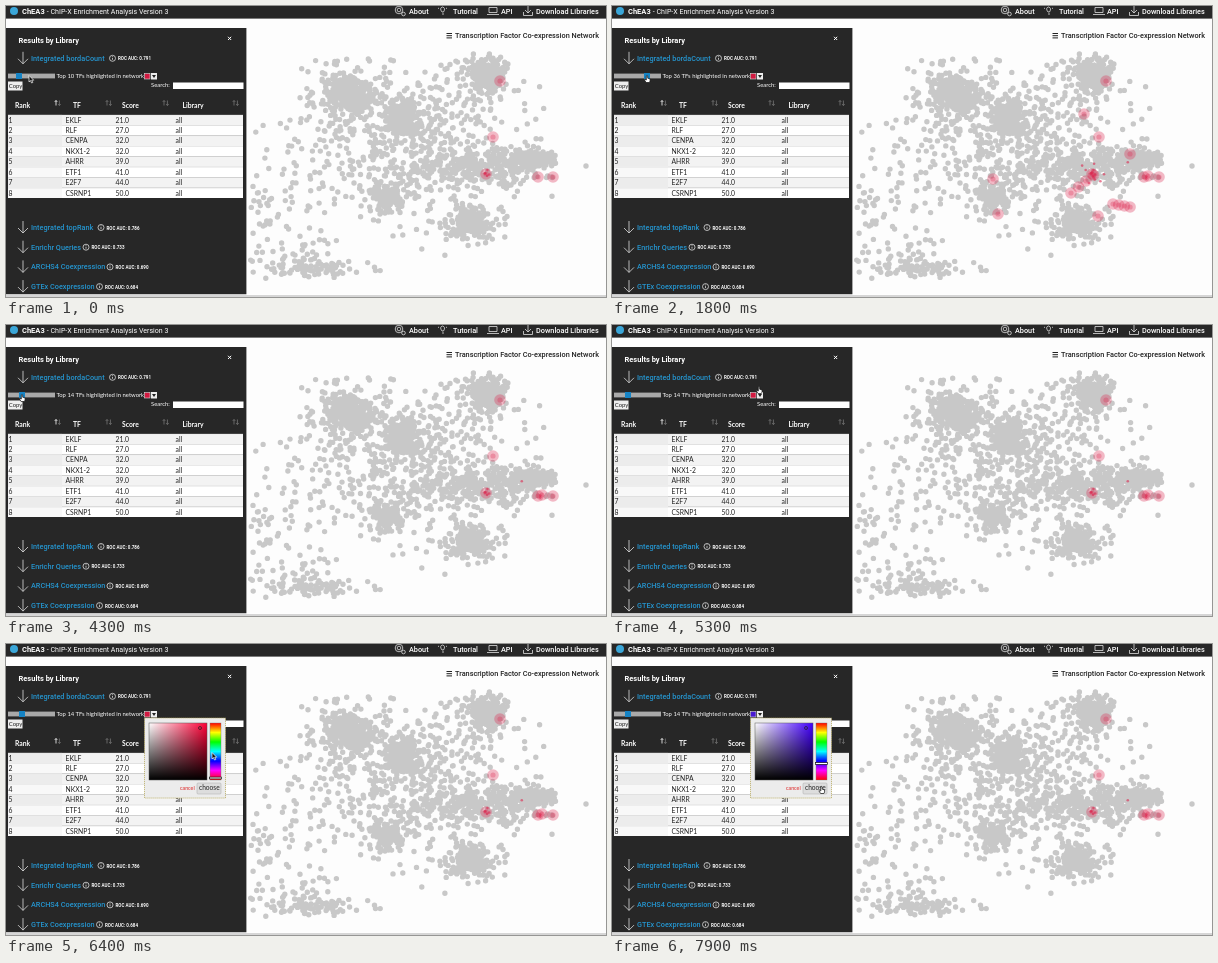
Animation of 600x291 px, one loop 8000 ms. Source, as an HTML page:

```html
<!DOCTYPE html>
<html lang="en">
<head>
<meta charset="utf-8">
<title>Transcription factor network</title>
<style>
html, body { margin: 0; width: 100%; height: 100%; overflow: hidden; background: #fdfdfd; }
svg { display: block; width: 100vw; height: 100vh; }
text { font: 500 7.3px Roboto, sans-serif; fill: #fff; white-space: pre; }
.title { font-weight: 700; font-size: 7.5px; }
.light { font-weight: 400; font-size: 7.05px; }
.dark { fill: #222; }
.link { fill: #2595cf; }
.roc { font-weight: 700; font-size: 4.5px; }
.label { font: 400 5.9px Lato, sans-serif; }
.cell { font: 400 6.8px Lato, sans-serif; fill: #222; }
.head { font: 700 6.8px Lato, sans-serif; }
.line { fill: none; stroke: #ddd; stroke-width: .8; }
.bold { stroke: #fff; stroke-width: 1; }
.ink { stroke: #222; stroke-width: 1; }
</style>
</head>
<body>
<svg id="stage" viewBox="0 0 600 291" xmlns="http://www.w3.org/2000/svg">
  <defs>
    <linearGradient id="toWhite"><stop stop-color="#fff"/><stop offset="1" stop-color="#fff" stop-opacity="0"/></linearGradient>
    <linearGradient id="toBlack" x2="0" y2="1"><stop stop-opacity="0"/><stop offset="1"/></linearGradient>
    <linearGradient id="spectrum" x2="0" y2="1"></linearGradient>
    <clipPath id="tableClip"><rect x="2" y="108.7" width="235" height="83.3"/></clipPath>
  </defs>
  <rect width="600" height="291" fill="#fdfdfd"/>
  <path id="dots" fill="none" stroke="#c8c8c8" stroke-width="5.4" stroke-linecap="round"/>
  <g id="hits"></g>
  <g id="page"></g>
  <rect id="thumb" y="67" width="6" height="6" fill="#1683c4"/>
  <text id="count" class="label" x="50.5" y="72.4"></text>
  <rect id="swatch" x="138.5" y="67.5" width="5.5" height="5.5" stroke="#ddd" stroke-width=".6"/>
  <rect x="145" y="67" width="6" height="6.5" fill="#eee"/><path d="M146 69h4l-2 3z" fill="#222"/>
  <g id="picker">
    <rect x="138.5" y="74" width="81" height="80" fill="#ececec" stroke="#b9ac62" stroke-width=".8" stroke-dasharray="1.2 .8"/>
    <rect id="shade" x="143" y="79" width="58" height="57"/>
    <rect x="143" y="79" width="58" height="57" fill="url(#toWhite)"/>
    <rect x="143" y="79" width="58" height="57" fill="url(#toBlack)" stroke="#555" stroke-width=".5"/>
    <circle cx="194" cy="84" r="1.5" fill="none" stroke="#222" stroke-width=".7"/>
    <rect x="204" y="79" width="11" height="57" fill="url(#spectrum)" stroke="#777" stroke-width=".4"/>
    <rect id="hueMark" x="203.5" width="12" height="1.8" fill="#fff" stroke="#111" stroke-width=".7"/>
    <text class="label" x="174" y="146" style="fill:#d22;font-size:5.3px">cancel</text>
    <rect x="191" y="139" width="24" height="11" rx="1" fill="#ddd" stroke="#aaa" stroke-width=".5"/>
    <text class="label dark" x="193" y="146.3" style="font-size:6.6px">choose</text>
  </g>
  <g id="cursor" stroke-linejoin="round" stroke-width=".7">
    <path id="arrow" d="M0 0v6.4l1.5-1.3 1.1 2.4 1.2-.5-1.1-2.3h2z" fill="#111" stroke="#fff"/>
    <path id="hand" d="M-.7 .4Q0-.6.7.4V2.7l2.4.7V5.5L2.4 7H-.9L-2.6 4.3l.7-.6 1.2.8z" fill="#fff" stroke="#111"/>
  </g>
</svg>
<script>
const $ = id => document.getElementById(id);
const LOOP = 8000;
const PANEL = '#272727';

const rect = (x, y, w, h, fill) => `<rect x="${x}" y="${y}" width="${w}" height="${h}" fill="${fill}"/>`;
const text = (x, y, s, cls = '') => `<text x="${x}" y="${y}" class="${cls}">${s}</text>`;
const line = (d, cls = '') => `<path class="line ${cls}" d="${d}"/>`;
const ring = (x, y, r) => `<circle class="line" cx="${x}" cy="${y}" r="${r}"/>`;

function header() {
  return rect(0, 0, 600, 12.6, PANEL) + '<circle cx="8" cy="5" r="4" fill="#3aa6d8"/>' +
    text(16, 8, 'ChEA3', 'title') + text(40.8, 8, '- ChIP-X Enrichment Analysis Version 3', 'light') +
    text(403, 7.7, 'About') + text(447, 7.7, 'Tutorial') + text(495, 7.7, 'API') + text(530, 7.7, 'Download Libraries') +
    ring(393, 4, 3.8) + ring(393, 4, 1.8) + ring(397.5, 8, 1.8) +
    line('M436 6Q433 2 436.5 1Q440 2 437.5 6zM436 8h2M432 2l1 .6M441 2l-1 .6') +
    line('M483 1.5h8v5h-8zM481 8.5h12') +
    line('M522 0v7m-3-3 3 3 3-3M517.5 6v3.5h9V6') +
    line('M440.5 27.5h5.5m-5.5 2.2h5.5m-5.5 2.2h5.5', 'ink') +
    text(449, 32, 'Transcription Factor Co-expression Network', 'dark');
}

function library(y, name, score, infoX) {
  return line(`M17 ${y - 9}v12m-5-5 5 5 5-5`) + text(25, y, name, 'link') +
    ring(infoX, y - 2.5, 3) + line(`M${infoX} ${y - 3}v2m0-3.5v.7`) +
    text(infoX + 5.5, y - .4, `ROC AUC: ${score}`, 'roc');
}

function column(x, name, sortX, active) {
  return text(x, 101.6, name, 'head') +
    `<g fill="none" stroke="#777" stroke-width=".8"><path d="M${sortX} 99.5v-5m-1.3 1.4 1.3-1.4 1.3 1.4"${active ? ' stroke="#fff"' : ''}/>` +
    `<path d="M${sortX + 3.4} 94.5v5m-1.3-1.4 1.3 1.4 1.3-1.4"/></g>`;
}

function table() {
  const scores = { EKLF: 21, RLF: 27, CENPA: 32, 'NKX1-2': 32, AHRR: 39, ETF1: 41, E2F7: 44, CSRNP1: 50 };
  const rows = Object.entries(scores).map(([name, score], i) => {
    const y = 108.7 + i * 10.45, base = y + 7.8;
    return rect(2, y, 235, 10.45, i % 2 ? '#fff' : '#f3f3f3') + rect(2, y, 54, 10.45, i % 2 ? '#f8f8f8' : '#ececec') +
      rect(2, y, 235, .5, '#ddd') + text(2.5, base, i + 1, 'cell') + text(59.5, base, name, 'cell') +
      text(109.5, base, score.toFixed(1), 'cell') + text(169.5, base, 'all', 'cell');
  });
  return column(9, 'Rank', 50, true) + column(67, 'TF', 101) + column(116, 'Score', 158) + column(176.5, 'Library', 228) +
    `<g clip-path="url(#tableClip)">${rows.join('')}</g>`;
}

function sidebar() {
  return rect(0, 22, 240.4, 266.5, PANEL) + text(12.5, 37, 'Results by Library', 'title') +
    line('M222 30.8l3.2 3.2m0-3.2-3.2 3.2', 'bold') +
    library(54.8, 'Integrated bordaCount', '0.791', 106.5) +
    rect(2, 67.6, 47, 4.8, '#a9a9a9') +
    rect(2, 75.5, 14.5, 9, '#eee') + text(2.8, 82.3, 'Copy', 'label dark') +
    text(145, 81.2, 'Search:', 'label') + rect(167, 76.5, 70.5, 6.5, '#fff') + table() +
    library(224, 'Integrated topRank', '0.786', 95) + library(243.7, 'Enrichr Queries', '0.733', 80) +
    library(263.4, 'ARCHS4 Coexpression', '0.690', 104) + library(283.1, 'GTEx Coexpression', '0.684', 93.5) +
    rect(0, 288.5, 600, 2.5, '#fff') + rect(0, 289.6, 600, .8, '#999');
}

let seed = 20;
const random = () => (seed = (seed * 16807) % 2147483647) / 2147483647;
const gauss = () => Math.sqrt(-2 * Math.log(random())) * Math.cos(2 * Math.PI * random());

function dots() {
  let d = 'M580 160h0';
  const dot = (x, y) => {
    if (x > 243 && x < 552 && y > 47 && y < 273) d += `M${x.toFixed(1)} ${y.toFixed(1)}h0`;
  };
  const cloud = (cx, cy, sx, sy, n) => {
    while (n--) dot(cx + gauss() * sx, cy + gauss() * sy);
  };
  // a dense core inside a looser fringe
  const cluster = (x, y, size, n) => {
    cloud(x, y, size, size * .9, n);
    cloud(x, y, size * 2.2, size * 1.8, n * .4 | 0);
  };
  cluster(344, 89, 10, 260);
  cluster(396, 111, 8, 170);
  cluster(481, 68, 8, 220);
  cluster(462, 216, 8, 160);
  cluster(383, 193, 8, 90);
  cloud(528, 154, 11, 5, 150);
  cloud(470, 160, 36, 10, 280);
  cloud(400, 135, 56, 40, 480);
  cloud(280, 215, 25, 28, 85);
  cloud(305, 262, 25, 6, 100);
  return d;
}

// highlighted factors in rank order; a speck has no halo
function rankedFactors() {
  const halo = (x, y) => ({ x, y, halo: true });
  const specks = (x, y, spread, n) => Array.from({ length: n }, () => ({ x: x + gauss() * spread, y: y + gauss() * spread }));
  const streak = (x, y, dx, dy) => Array.from({ length: 4 }, (_, i) => halo(x + dx * i, y + dy * i));
  return [
    halo(494, 75), halo(487, 131), halo(480, 168), halo(532, 171), halo(547, 171), ...specks(480, 168, 2.5, 5),
    halo(536, 170), ...specks(516, 156, .5, 1), ...specks(534, 171, 1, 2),
    halo(472, 108), halo(381, 173), halo(386, 208), halo(486, 210), halo(518, 148),
    ...streak(501, 198, 5.7, 1), ...streak(459, 187, 7.5, -6), ...specks(482, 172, 7, 9)
  ];
}

$('page').innerHTML = header() + sidebar();
$('dots').setAttribute('d', dots());
$('hits').innerHTML = rankedFactors().map(({ x, y, halo }) => '<g fill="#dc2850">' +
  (halo ? `<circle cx="${x}" cy="${y}" r="5.8" fill-opacity=".32"/>` : '') +
  `<circle cx="${x}" cy="${y}" r="${halo ? 2.6 : 1.3}" fill-opacity="${halo ? .3 : .6}"/></g>`).join('');
$('spectrum').innerHTML = Array.from({ length: 7 }, (_, i) => `<stop offset="${i / 6}" stop-color="hsl(${i * 60},100%,50%)"/>`).join('');

function ramp(t, from, to) {
  const p = Math.min(1, Math.max(0, (t - from) / (to - from)));
  return p * p * (3 - 2 * p);
}

function draw(time) {
  const t = Math.floor((time % LOOP) / 100) * 100;
  const toMenu = ramp(t, 4600, 5300), toHue = ramp(t, 5800, 6350), alongHue = ramp(t, 6500, 7200), toChoose = ramp(t, 7400, 7850);
  const thumb = 13 + 22 * ramp(t, 400, 1600) - 23 * ramp(t, 2100, 3000) + 4 * ramp(t, 3900, 4300);
  const x = thumb + 10 * (1 - ramp(t, 0, 400)) + 131 * toMenu + 59 * toHue + 5 * alongHue - 1.5 * toChoose;
  const y = 69.5 - 8 * toMenu + 7.5 * ramp(t, 5300, 5500) + 39.5 * toHue + 11 * alongHue + 23 * toChoose;

  // the label and the network lag behind the thumb on its way back
  const fromThumb = Math.max(10, Math.round(10 + (thumb - 13) * 26 / 22));
  const count = t >= 1600 && t < 3500 ? 36 : t < 4300 ? fromThumb : 14;
  const hueY = t < 6500 ? 134 : Math.min(y, 119.5);
  const hue = (hueY - 79) / 57 * 360;

  $('thumb').setAttribute('x', thumb - 3);
  $('count').textContent = `Top ${count} TFs highlighted in network`;
  [...$('hits').children].forEach((hit, i) => hit.setAttribute('visibility', i < count ? 'visible' : 'hidden'));
  $('swatch').setAttribute('fill', `hsl(${hue},79%,46%)`);
  $('shade').setAttribute('fill', `hsl(${hue},100%,50%)`);
  $('hueMark').setAttribute('y', hueY - .9);
  $('picker').setAttribute('visibility', t >= 5700 ? 'visible' : 'hidden');

  const hand = (t >= 400 && t < 5800) || t >= 7700;
  $('cursor').setAttribute('transform', `translate(${x} ${y})`);
  $('hand').setAttribute('display', hand ? 'inline' : 'none');
  $('arrow').setAttribute('display', hand ? 'none' : 'inline');
}

const start = performance.now();
function tick() {
  draw(performance.now() - start);
  requestAnimationFrame(tick);
}
tick();
</script>
</body>
</html>
```
